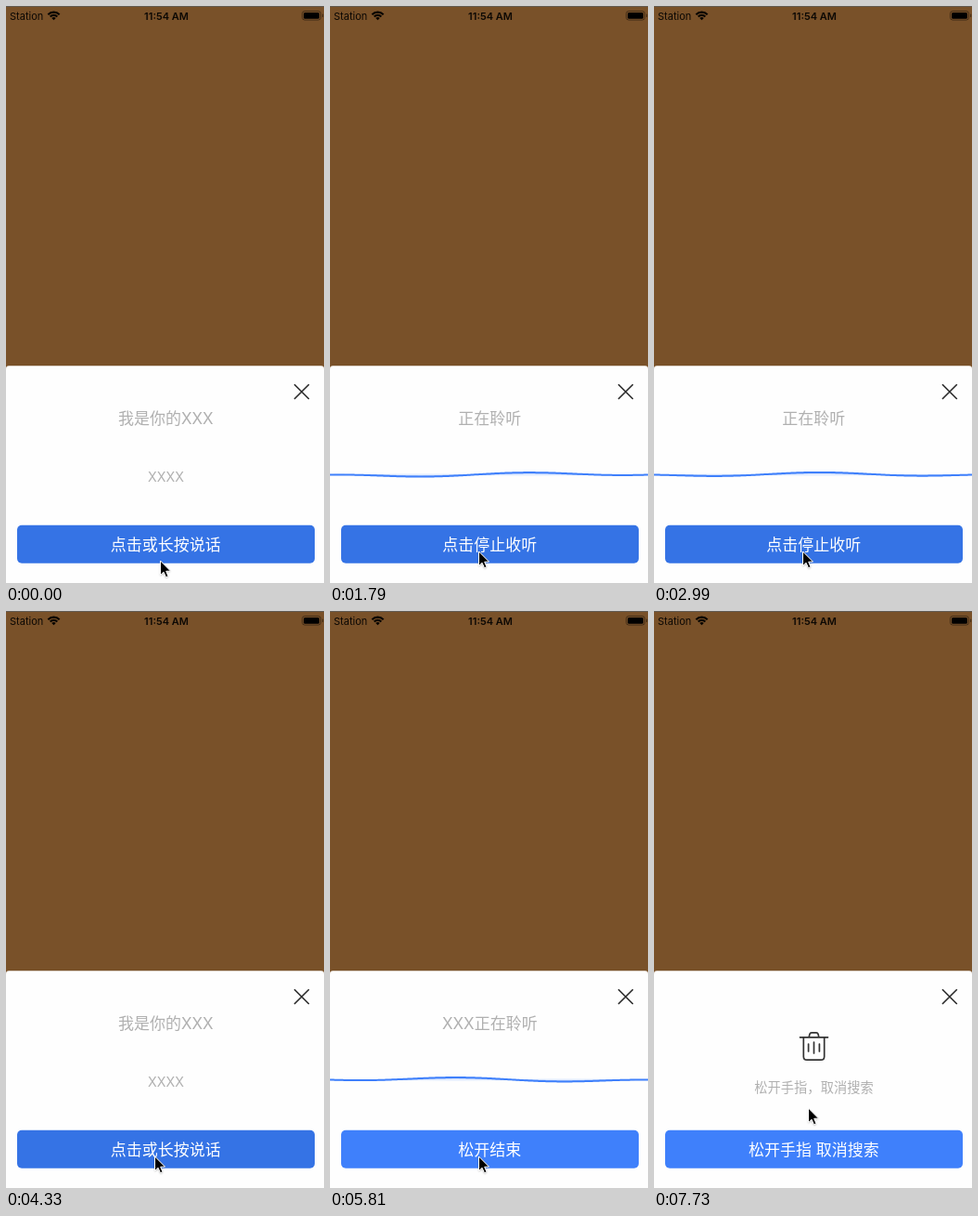
These frames come from a looping animation (343x621 px, 8000 ms). An HTML page with a canvas:

```html
<!DOCTYPE html>
<html lang="zh-CN">
<head>
<meta charset="utf-8">
<title>Voice sheet</title>
<style>
html, body { margin: 0; width: 100%; height: 100%; overflow: hidden; background: #fff; }
canvas { display: block; width: 343px; height: 621px; }
</style>
</head>
<body>
<canvas id="stage"></canvas>
<script>
const W = 343, H = 621, LOOP = 8000;
const BLUE = '#3f80fb', BLUE_IDLE = '#3573e5', GREY = '#b0b0b0';
const FONT = 'Inter, "Noto Sans CJK SC", "Noto Sans CJK JP", "Noto Sans CJK", sans-serif';
const canvas = document.getElementById('stage');
const ctx = canvas.getContext('2d');
const dpr = window.devicePixelRatio || 1;
canvas.width = W * dpr;
canvas.height = H * dpr;

// Times at which the held-button wave is refreshed
const HOLD_TICKS = [4930, 5070, 5220, 5370, 5520, 5660, 5810, 5950, 6100, 6250,
  6400, 6550, 6700, 6840, 6990, 7140, 7290, 7440, 7590, 7730];

const CURSOR_KEYS = [[0, 166.5, 597], [150, 163.5, 592], [290, 160.5, 587],
  [7440, 161.5, 577], [7590, 164.5, 554], [7730, 166.5, 535]];

const lastKey = (keys, t) => keys.filter(k => k[0] <= t).pop();

function text(str, x, y, size, color, align = 'center', weight = 400) {
  ctx.font = `${weight} ${size}px ${FONT}`;
  ctx.textAlign = align;
  ctx.fillStyle = color;
  ctx.fillText(str, x, y);
}

function box(x, y, w, h, r, color) {
  ctx.beginPath();
  ctx.roundRect(x, y, w, h, r);
  ctx.fillStyle = color;
  ctx.fill();
}

function stroke(color, width, build) {
  ctx.beginPath();
  build();
  ctx.strokeStyle = color;
  ctx.lineWidth = width;
  ctx.stroke();
}

function line(x1, y1, x2, y2) {
  ctx.moveTo(x1, y1);
  ctx.lineTo(x2, y2);
}

function statusBar() {
  text('Station', 4, 14.8, 11, '#0c0804', 'left');
  text('11:54 AM', 173, 14.8, 11, '#0c0804', 'center', 600);
  const cx = 51.5, cy = 15.3, a = Math.PI / 4;
  for (const r of [8.7, 5.4]) {
    stroke('#080500', 2.1, () => ctx.arc(cx, cy, r, -Math.PI / 2 - a, -Math.PI / 2 + a));
  }
  ctx.beginPath();
  ctx.moveTo(cx, cy);
  ctx.arc(cx, cy, 3.2, -Math.PI / 2 - a, -Math.PI / 2 + a);
  ctx.fillStyle = '#080500';
  ctx.fill();
  stroke('rgba(0,0,0,.42)', 1, () => ctx.roundRect(319.5, 5.5, 20, 9.6, 2.8));
  box(341, 8.6, 1.2, 3.4, 0.6, 'rgba(0,0,0,.42)');
  box(321, 7, 17, 6.8, 1.6, '#000');
}

function wave(phase) {
  const mid = 504.5, freq = 4;
  const layers = [[-0.3, 1, 0.12], [0.25, 1, 0.22], [0.6, 1.2, 0.32], [1, 2, 1]];
  for (const [gain, width, alpha] of layers) {
    ctx.globalAlpha = alpha;
    stroke(BLUE, width, () => {
      for (let x = 0; x <= W; x++) {
        const u = 2 * x / W - 1;
        ctx.lineTo(x, mid - 2.6 * gain * (1 - u * u) * Math.cos(freq * u - phase));
      }
    });
  }
  ctx.globalAlpha = 1;
}

function trash() {
  ctx.lineCap = ctx.lineJoin = 'round';
  stroke('#333', 1.7, () => {
    line(157.5, 458.8, 187.5, 458.8);
    ctx.moveTo(167.3, 458);
    ctx.lineTo(168, 455.3);
    ctx.quadraticCurveTo(168.4, 453.8, 170, 453.8);
    ctx.lineTo(175, 453.8);
    ctx.quadraticCurveTo(176.6, 453.8, 177, 455.3);
    ctx.lineTo(177.7, 458);
    ctx.moveTo(161.3, 459);
    ctx.lineTo(161.3, 479.5);
    ctx.quadraticCurveTo(161.3, 483.2, 165, 483.2);
    ctx.lineTo(180, 483.2);
    ctx.quadraticCurveTo(183.7, 483.2, 183.7, 479.5);
    ctx.lineTo(183.7, 459);
    line(166.6, 466, 166.6, 474);
    line(172.5, 464, 172.5, 476);
    line(178.4, 466, 178.4, 474);
  });
  ctx.lineCap = 'butt';
  ctx.lineJoin = 'miter';
}

function cursor(x, y) {
  const points = [[0, 0], [0, 15.6], [3.6, 12.3], [6, 17.8], [8.5, 16.7], [6.2, 11.3], [11, 11.1]];
  ctx.save();
  ctx.translate(x, y);
  ctx.beginPath();
  points.forEach(p => ctx.lineTo(...p));
  ctx.closePath();
  ctx.shadowColor = 'rgba(0,0,0,.35)';
  ctx.shadowBlur = 2 * dpr;
  ctx.shadowOffsetY = dpr;
  ctx.fillStyle = '#fff';
  ctx.fill();
  ctx.shadowColor = 'transparent';
  ctx.fillStyle = '#000';
  ctx.fill();
  ctx.strokeStyle = '#fff';
  ctx.lineWidth = 1;
  ctx.stroke();
  ctx.restore();
}

function button(label, color) {
  box(12, 558.7, 321, 41, 5, color);
  text(label, 172.3, 585.7, 17, '#fff');
}

function wavePhase(t, start, startPhase) {
  return startPhase - 6.05 * (t - start) / 1000;
}

function sheet(t) {
  if (t >= 7590) {
    trash();
    text('松开手指，取消搜索', 172.5, 518.3, 14.25, GREY);
    button('松开手指 取消搜索', BLUE);
  } else if (t >= 4930) {
    const tick = HOLD_TICKS.filter(k => k <= t).pop();
    text('XXX正在聆听', 172.3, 450, 17, GREY);
    wave(wavePhase(tick, 4930, -1.91));
    button('松开结束', BLUE);
  } else if (t >= 590 && t < 3290) {
    const tick = 590 + Math.floor((t - 590) / 150) * 150;
    text('正在聆听', 172.3, 450, 17, GREY);
    wave(wavePhase(tick, 1790, 1.16));
    button('点击停止收听', BLUE_IDLE);
  } else {
    text('我是你的XXX', 172.3, 450, 17, GREY);
    text('XXXX', 172.5, 512, 14.25, GREY);
    button('点击或长按说话', BLUE_IDLE);
  }
}

function draw(t) {
  ctx.setTransform(dpr, 0, 0, dpr, 0, 0);
  box(0, 0, W, H, 0, '#795129');
  box(0, 0, W, 1, 0, '#625a50');
  statusBar();
  box(0, 387.3, W, H - 387.3, [3, 3, 0, 0], '#fefefe');
  stroke('#2a2a2a', 1.6, () => {
    line(311, 407.3, 326.8, 423);
    line(326.8, 407.3, 311, 423);
  });
  sheet(t);
  const [, x, y] = lastKey(CURSOR_KEYS, t);
  cursor(x, y);
}

const begin = performance.now();
function loop() {
  draw((performance.now() - begin) % LOOP);
  requestAnimationFrame(loop);
}
loop();
</script>
</body>
</html>
```
